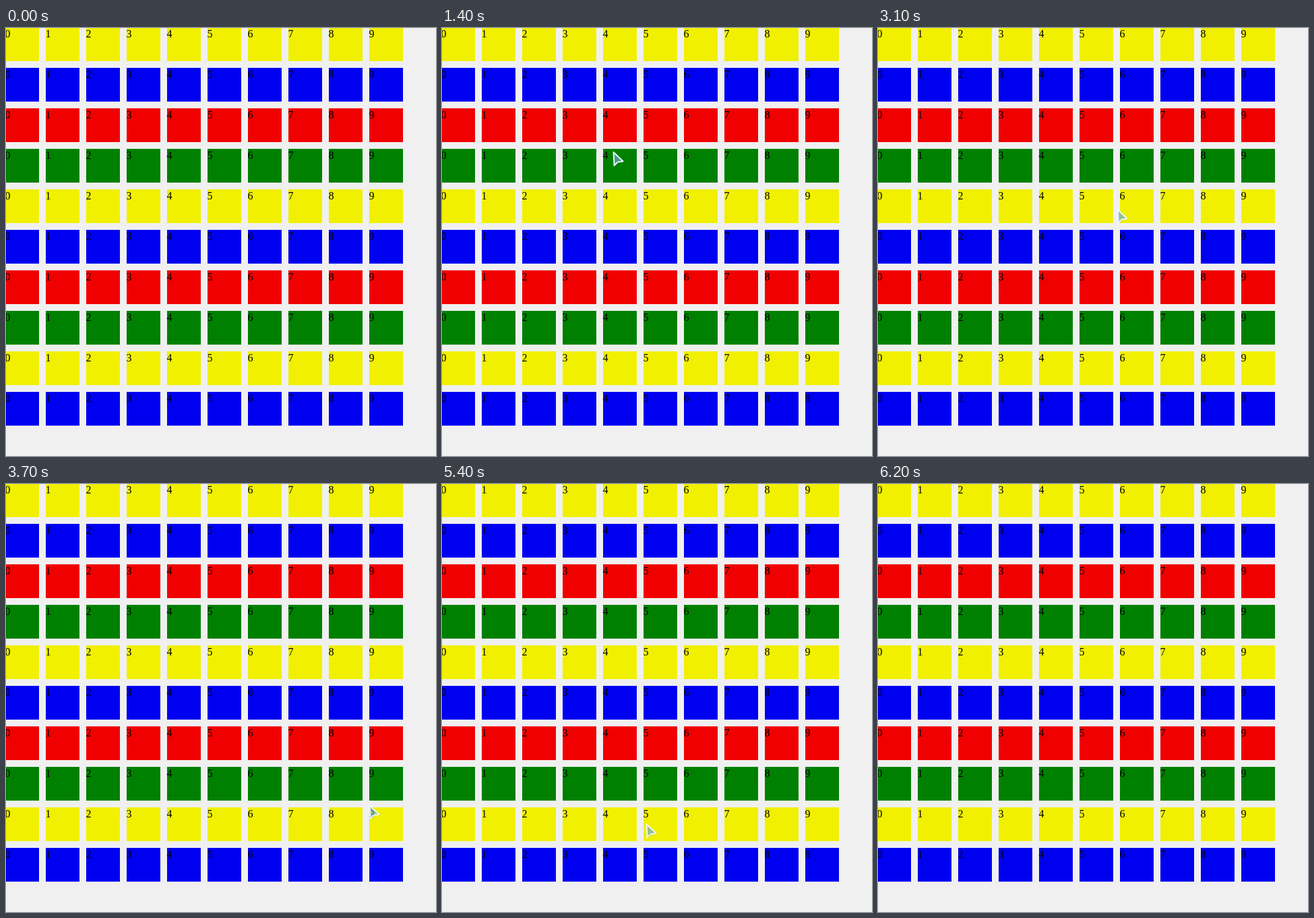
Write an HTML page with a canvas that moves like this. It is 638 by 634 pixels and loops after 6300 ms.

```html
<!DOCTYPE html>
<html lang="en">
<head>
<meta charset="utf-8">
<title>Colour grid</title>
<style>
  html, body { margin: 0; width: 100%; height: 100%; overflow: hidden; background: #f0f0f0; }
  canvas { display: block; }
</style>
</head>
<body>
<canvas id="stage" width="638" height="634"></canvas>
<script>
const ctx = document.getElementById('stage').getContext('2d');
const W = 638, H = 634, LOOP = 6300, TICK = 100;
const COLORS = ['#f0f000', '#0000f0', '#f00000', '#008000'];
const INK = '#4a535f', PALE = '#929aa3';

// Pointer strokes: start, end, then where the stroke stops
const SHOW = 100, HIDE = 5500;
const MOVES = [
  [0, SHOW, 386, 213],
  [500, 800, 302, 181],
  [1300, 1700, 190, 185],
  [2300, 2600, 92, 174],
  [2600, 2800, 170, 192],
  [3000, 3100, 354, 268],
  [3100, 3700, 538, 475],
  [3700, 3900, 613, 605],
  [4100, 4400, 406, 452],
  [4400, 4600, 382, 448],
  [4800, 5000, 371, 448],
  [5100, 5400, 302, 503]
];

const clamp = v => Math.max(0, Math.min(1, v));
const easeOut = v => 1 - (1 - v) ** 2;

function pointerAt(t) {
  let x = 0, y = 0;
  for (const [from, to, tx, ty] of MOVES) {
    const k = easeOut(clamp((t - from) / (to - from)));
    x += (tx - x) * k;
    y += (ty - y) * k;
  }
  return [Math.round(x), Math.round(y)];
}

// Fades in early, holds, then fades out over three ticks
function previewAlpha(t) {
  if (t < HIDE) return 0;
  return t < 5800 ? 0.8 : clamp((6200 - t) / 300);
}

function rect(x, y, w, h, color) {
  ctx.fillStyle = color;
  ctx.fillRect(x, y, w, h);
}

function poly(points, color) {
  ctx.beginPath();
  points.forEach(([x, y]) => ctx.lineTo(x, y));
  ctx.closePath();
  ctx.fillStyle = color;
  ctx.fill();
}

function text(str, x, y, color = INK) {
  ctx.font = '2.7px "Noto Sans CJK SC", "Noto Sans CJK", sans-serif';
  ctx.fillStyle = color;
  ctx.fillText(str, x, y);
}

function drawGrid() {
  rect(0, 0, W, H, '#f0f0f0');
  ctx.font = '16px "Liberation Serif", serif';
  for (let row = 0; row < 10; row++) {
    for (let col = 0; col < 10; col++) {
      const x = col * 60 - 1, y = row * 60 - 1;
      rect(x, y, 50, 50, COLORS[row % COLORS.length]);
      ctx.fillStyle = '#000';
      ctx.fillText(col, x - 0.5, y + 15);
    }
  }
}

function drawPointer([x, y]) {
  const arrow = [[1.5, 1], [15.6, 14.4], [8, 15.4], [2.6, 20.8]];
  ctx.save();
  ctx.translate(x, y);
  ctx.lineJoin = 'round';
  ctx.translate(1.4, 1.2);
  poly(arrow, 'rgba(50,70,80,.2)');
  ctx.translate(-1.4, -1.2);
  poly(arrow, 'rgba(115,180,225,.6)');
  ctx.strokeStyle = 'rgba(240,250,253,.95)';
  ctx.lineWidth = 2;
  ctx.stroke();
  ctx.restore();
}

function drawGlass() {
  const x = 464, y = 473, w = W - x, h = H - y;
  ctx.save();
  ctx.beginPath();
  ctx.roundRect(x, y, w + 10, h, 7);
  ctx.clip();
  rect(x, y, w, h, '#afc0e0');
  const tint = ctx.createLinearGradient(x, y + 20, x - 30, H);
  tint.addColorStop(0, 'rgba(171,207,224,0)');
  tint.addColorStop(0.6, '#abcfe0');
  rect(x, y, w, h, tint);
  const band = (left, width, color) => poly(
    [[left, y], [left + width, y], [left + width + 34, y + 42], [left + 34, y + 42]], color);
  band(520, 36, '#a9cfe0');
  band(562, 12, '#b0cce2');
  ctx.restore();
}

function drawList() {
  const groups = [
    ['收藏夹', '最近访问', '下载', '桌面', '文档备份'],
    ['库', '视频', '图片', '文档', '我的音乐'],
    ['计算机', '本地磁盘(C:)', '工作磁盘(D:)', '资料'],
    ['网络']
  ];
  let y = 529;
  for (const names of groups) {
    names.forEach((name, i) => {
      const x = i ? 486 : 484;
      rect(x, y - 1.2, 2, 2, i ? '#809cb7' : '#d0a65c');
      text(name, x + 3, y + 1);
      y += 3.4;
    });
    y += 6;
  }
}

function drawPreview(alpha) {
  const x = 481, w = W - x;
  ctx.save();
  ctx.globalAlpha = alpha;
  drawGlass();

  rect(x, 513, w, 102, '#f0f1f2');
  ['#b3cde4', '#e0e8f0', '#d9e4f0'].forEach((color, i) => rect(x, 513 + i * 4, w, 4, color));
  rect(x, 602, w, 13, '#e9eff5');
  rect(x + 1, 514, 10, 2, '#5b81a9');

  text('▸ 计算机 ▸ 本地磁盘 ▸ 工作资料 ▸ 图片 ▸', 497, 515.8);
  text('文件(F)  编辑(E)  查看(V)  工具(T)', 483, 519.8);
  text('组织 ▾   打开 ▾   新建文件夹', 483, 523.9);

  const columns = [
    [508, '名称', '▪ 示例页面文件'],
    [545, '修改日期', '今天 10:30'],
    [563, '类型', '网页文档'],
    [581, '大小', '12 KB']
  ];
  columns.forEach(([left, head, value], i) => {
    text(head, left, 528.3);
    text(value, left, 532.9, i ? PALE : INK);
  });
  drawList();

  ctx.beginPath();
  ctx.arc(489, 608.5, 5.2, 0, Math.PI * 2);
  ctx.fillStyle = '#d94f40';
  ctx.fill();
  text('示例页面文件  修改日期: 今天 10:30', 497, 605.5);
  text('网页文档          大小: 12 KB', 497, 608.5);
  text('创建日期: 今天', 519, 611.5);
  ctx.restore();
}

function draw(now) {
  const t = Math.floor((now % LOOP) / TICK) * TICK;
  const alpha = previewAlpha(t);
  drawGrid();
  if (t >= SHOW && t < HIDE) drawPointer(pointerAt(t));
  if (alpha) drawPreview(alpha);
}

const start = performance.now();
function loop() {
  draw(performance.now() - start);
  requestAnimationFrame(loop);
}
loop();
</script>
</body>
</html>
```
